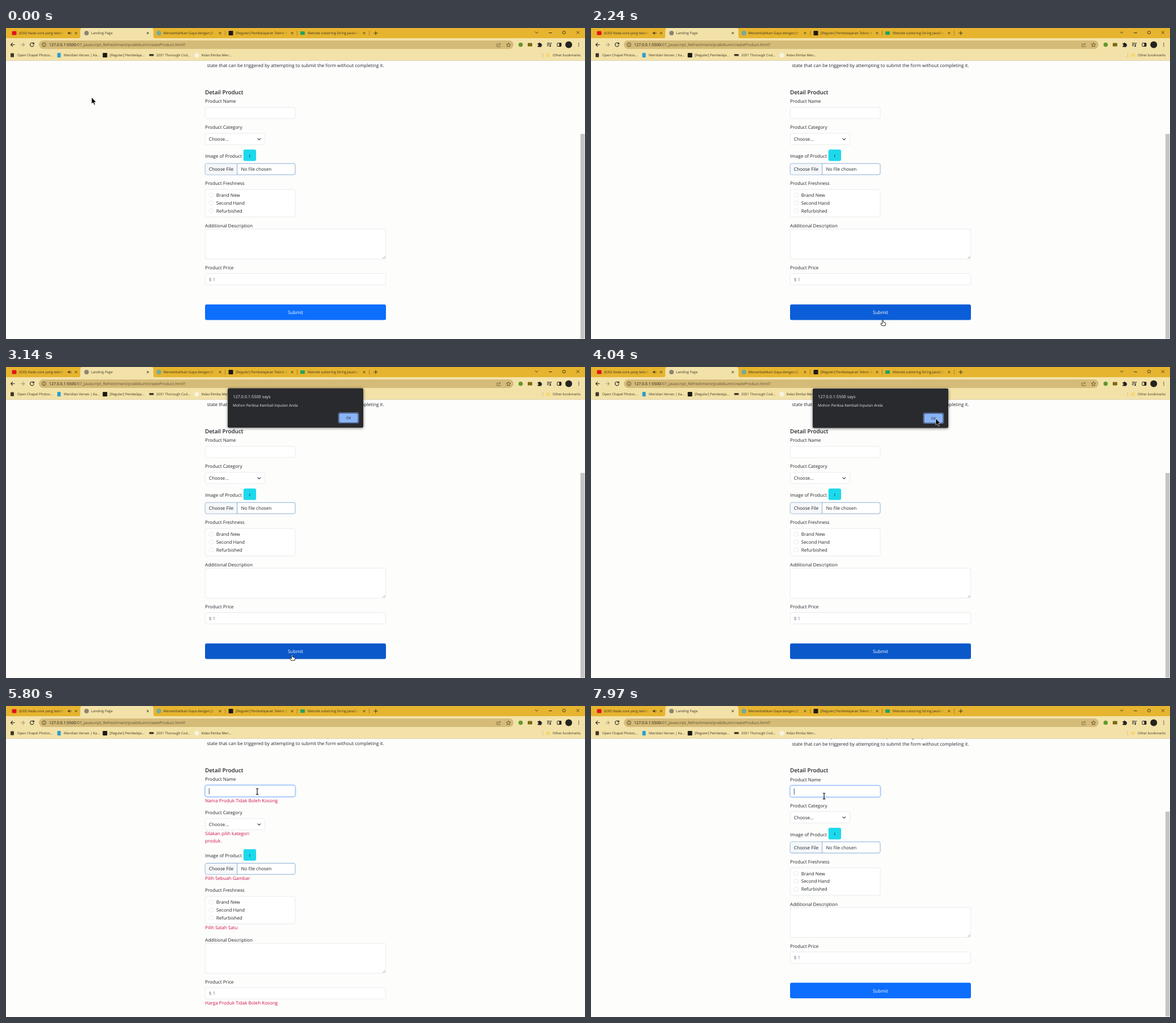
An HTML page that plays this animation: 1021 px wide and 549 px high, repeating every 8 s.

```html
<!DOCTYPE html>
<html lang="id">
<head>
<meta charset="utf-8">
<title>Landing Page</title>
<style>
html, body { margin: 0; width: 100%; height: 100%; overflow: hidden; background: #fdfdfc }
svg { display: block; width: 1021px; height: 549px }
text { font-family: "Open Sans", "Noto Sans", sans-serif; text-rendering: geometricPrecision; white-space: pre }
</style>
</head>
<body>
<svg id="stage" viewBox="0 0 1021 549"></svg>
<script>
const STRIP = '#e6b42f', BAR = '#f3e2a8', INK = '#212529', LINE = '#dee2e6', DARK = '#3b3423';
const LOOP = 8000, STEP = 12.77;

// Text is placed by the vertical centre of its capitals.
const text = (x, y, s, size = 8.12, fill = INK, more = '') =>
  `<text x="${x}" y="${y + size * 0.36}" font-size="${size}" fill="${fill}" ${more}>${s}</text>`;
const rect = (x, y, w, h, fill, r = 0, more = '') =>
  `<rect x="${x}" y="${y}" width="${w}" height="${h}" rx="${r}" fill="${fill}" ${more}/>`;
const circle = (x, y, r, fill, more = '') => `<circle cx="${x}" cy="${y}" r="${r}" fill="${fill}" ${more}/>`;
const line = (d, stroke = DARK, w = 1, more = '') =>
  `<path d="${d}" fill="none" stroke="${stroke}" stroke-width="${w}" ${more}/>`;
const group = (id, body, more = '') => `<g id="${id}" ${more}>${body}</g>`;
const field = (y, w, h, stroke = LINE) => rect(351.2, y, w, h, '#fff', 3, `stroke="${stroke}" stroke-width=".7"`);
const cross = (x, y, r = 2) => line(`M${x - r} ${y - r}l${2 * r} ${2 * r}m0 ${-2 * r}l${-2 * r} ${2 * r}`, DARK, 0.9);

function tab(x, title, icon, end) {
  return icon + `<svg x="${x}" y="0" width="${end - x}" height="18">${text(0, 9, title, 6.1, DARK)}</svg>`
    + rect(end - 12, 2, 12, 14, 'url(#fade)');
}

function toolbar() {
  let s = rect(0, 0, 1021, 19, STRIP) + rect(0, 18, 1021, 39, BAR) + rect(0, 57, 1021, 0.8, '#d9cda9');
  s += `<path d="M127 18.5q4 0 4-4V4q0-4 4-4h121q4 0 4 4v10.500q0 4 4 4z" fill="${BAR}"/>`;
  s += tab(23, '(630) Nada sore yang teduh untuk', rect(10.500, 5.500, 8, 7, '#e3121b', 1.500), 104);
  s += '<path d="M109 8h1.500l2-1.800v5.600l-2-1.800h-1.500z" fill="#3b3423"/>' + line('M114 7.300q1.600 1.700 0 3.400', DARK, 0.8);
  s += circle(142, 9, 4, '#8b8572') + text(150, 9, 'Landing Page', 6.1, DARK);
  s += tab(277.500, 'Menambahkan Gaya dengan JS', circle(269.500, 9, 4.300, '#74aa9c'), 371);
  s += tab(405, '[Reguler] Pembelajaran Teknis Reguler', rect(392.500, 5, 8, 8, '#1d1a14', 1), 498);
  s += tab(532, 'Metode substring String JavaScript', rect(519, 6, 8, 6, '#1fa463', 1), 624);
  for (const x of [123.500, 250, 377.500, 504.500, 631.500]) s += cross(x, 9);
  for (const x of [386, 513, 640]) s += rect(x, 5, 0.7, 8, '#8a6c1d');
  s += line('M648.500 9h7M652 5.500v7M933 6.500l2.700 2.700 2.700-2.700M957 8.500h6', DARK);
  s += rect(981.800, 5.800, 4.500, 4.500, 'none', 0.8, `stroke="${DARK}" stroke-width=".9"`) + cross(1008.500, 8, 2.500);

  s += rect(58, 22, 837, 15, '#d5bb78', 7.500);
  s += line('M15.500 29.500h-7m3.300-3.300l-3.300 3.300 3.300 3.300', '#222', 1.100);
  s += line('M25.500 29.500h7m-3.300-3.300l3.300 3.300-3.300 3.300', '#a99c72', 1.100);
  s += line('M48.500 27.200a3.400 3.400 0 1 0 .7 3M49.300 25.500v2.600h-2.600', '#222', 1.100);
  s += circle(67, 29.500, 3.400, 'none', `stroke="${DARK}" stroke-width=".8"`) + line('M67 29v2.200M67 27.300v.9', DARK, 0.8);
  s += text(76, 29.500, '127.0.0.1:5500<tspan fill="#5d5131">/07_Javascript_Refreshment/praktikum/createProduct.html?</tspan>', 6.960, '#1c1a14');
  s += line('M867.500 28h-1.800v5h6v-1.500M867.800 31q.3-3 4-3m-1.500-1.700l1.800 1.700-1.800 1.700', '#6b5d38', 0.8);
  s += line('M886 26l1.100 2.400 2.600.3-1.900 1.800.5 2.600-2.300-1.300-2.300 1.300.5-2.600-1.900-1.800 2.600-.3z', '#4c4227', 0.8);
  s += circle(907.500, 29.500, 3.800, '#5e9a2b') + rect(920, 26.500, 8, 6, '#7b6a14', 1);
  s += '<path d="M937.500 27h2a1.300 1.300 0 1 1 2.600 0h2v2a1.300 1.300 0 1 1 0 2.600v2h-6.600v-2.200a1.200 1.200 0 1 0 0-2.300z" fill="#222"/>';
  s += line('M954 26.700h5M954 29h5M954 31.300h3M960.300 32v-5.300h2', '#222', 1) + circle(959.600, 32, 1.200, '#222');
  s += rect(972, 26.500, 7, 6, 'none', 0.8, 'stroke="#222"') + rect(975.500, 26.500, 3.500, 6, '#222');
  s += circle(992.300, 29.500, 6, '#25231f');
  for (const y of [26.800, 29.500, 32.200]) s += circle(1010, y, 0.8, '#222');

  const marks = [
    [20, 'Open Chapel Photos...', rect(8, 44.500, 6, 7, '#3d382a', 1)],
    [102, 'Meridian Verses | Ka...', rect(90.500, 44, 6, 8, '#2a9fd0', 1)],
    [183, '[Reguler] Pembelaja...', rect(170.500, 44, 8, 8, '#1d1a14', 1)],
    [265, '2031 Thorough Cod...', rect(252.500, 46, 8, 3.500, '#3d382a', 1)],
    [344.500, 'Kelas Rimba Men...', circle(336.500, 48, 4.200, '#f8f3df')],
    [964, 'Other bookmarks', rect(952, 45, 7, 6, '#f7d774', 1)]
  ];
  for (const [x, label, icon] of marks) s += icon + text(x, 48, label, 6, DARK);
  return s + rect(946, 44, 0.7, 8, '#c7b57a');
}

function page() {
  const rows = [
    [0, text(351, 129.500, 'Product Name') + group('name', field(140, 158.800, 20))
      + group('caret', rect(357.800, 145, 0.8, 11, INK))],
    [1, text(351, 175.500, 'Product Category') + field(186, 105.500, 20) + text(357.800, 196, 'Choose...')
      + line('M443.500 194.800l2.800 2.600 2.800-2.600', '#343a40', 1.100)],
    [3, text(351, 226, 'Image of Product') + rect(418.700, 214.500, 22.300, 20.300, '#1cd9ec', 3)
      + '<text x="428.700" y="227.500" font-size="6.500" font-style="italic" style="font-family:\'Noto Serif\',serif">i</text>'
      + field(239.200, 158.800, 19.800, '#5a8fc0') + rect(351.800, 239.700, 55.500, 18.800, '#f5f7f9', 2)
      + rect(407.200, 239.200, 0.7, 19.800, '#5a8fc0')
      + text(357.800, 249.200, 'Choose File') + text(414.500, 249.200, 'No file chosen')],
    [4, text(351, 274.200, 'Product Freshness') + field(285, 158.800, 48.500)
      + ['Brand New', 'Second Hand', 'Refurbished'].map((s, i) => {
        const y = 295 + i * 13.8;
        return circle(362, y, 4, '#fff', `stroke="${LINE}" stroke-width=".7"`) + text(370.800, y, s);
      }).join('')],
    [5, text(351, 349, 'Additional Description') + field(355, 318.500, 53)
      + line('M664.500 406.800l4-4M667 406.800l1.500-1.500', '#777', 0.7)
      + text(351, 423.200, 'Product Price') + field(433.500, 318.500, 20) + text(357.800, 443.700, '$ 1', 8.12, '#6c757d')],
    [6, group('submit', rect(351, 488, 319, 27.500, 'currentColor', 3))
      + text(510.500, 502, 'Submit', 8.12, '#fff', 'text-anchor="middle"')]
  ];
  const errors = [
    [167, 'Nama Produk Tidak Boleh Kosong'], [225.500, 'Silakan pilih kategori'], [238.200, 'produk.'],
    [304, 'Pilih Sebuah Gambar'], [391.500, 'Pilih Salah Satu'], [524.300, 'Harga Produk Tidak Boleh Kosong']
  ];
  const mid = 'text-anchor="middle"';
  return text(510.500, 53.200, "with Bootstrap's form controls. Each required form group has a validation", 8.12, INK, mid)
    + text(510.500, 66, 'state that can be triggered by attempting to submit the form without completing it.', 8.12, INK, mid)
    + text(351, 113, 'Detail Product', 9.800, INK, 'font-weight="600"')
    + rows.map(([n, body]) => `<g class="row" data-n="${n}">${body}</g>`).join('')
    + group('errors', errors.map(([y, s]) => text(351, y, s, 8.12, '#d01045')).join(''));
}

const dialog = rect(391, 37.500, 239, 69.500, '#292a2d', 2, 'style="filter:drop-shadow(0 1px 2.500px #0008)"')
  + text(400, 52, '127.0.0.1:5500 says', 7.350, '#e8eaed')
  + text(400, 67.500, 'Mohon Periksa Kembali Inputan Anda', 6.530, '#e8eaed')
  + group('ring', rect(586.300, 80.500, 35.400, 18.500, 'none', 2.500, 'stroke="#5f7fb5" stroke-width="1.200"'))
  + rect(587.500, 81.700, 33, 16.200, '#8ab4f8', 2)
  + text(604, 89.800, 'OK', 6.200, '#202124', 'text-anchor="middle"');

const cursors = {
  arrow: '<path d="M0 0V11.500L2.600 9.100 4.500 13.300 6.300 12.500 4.500 8.500H8Z" fill="#000" stroke="#fff" stroke-width=".6"/>',
  hand: '<path d="M-1 1Q0-.5 1 1V4.500L4.300 5.200Q5.300 5.500 5.200 7L4.500 10.500H-1.500L-4 7Q-3.500 5.500-1 7.200Z" fill="#fff" stroke="#111" stroke-width=".9"/>',
  beam: line('M-2.300-5.300Q0-5.300 0-4Q0-5.300 2.300-5.300M0-4.500V4.500M-2.300 5.300Q0 5.300 0 4Q0 5.300 2.300 5.300', '#000', 1.100)
};

const stage = document.getElementById('stage');
stage.innerHTML = `<defs><linearGradient id="fade"><stop stop-color="${STRIP}" stop-opacity="0"/>`
  + `<stop offset="1" stop-color="${STRIP}"/></linearGradient></defs>`
  + rect(0, 0, 1021, 549, '#fdfdfc') + group('page', page())
  + group('thumb', rect(1013, 187, 7.500, 361.500, '#c5c5c6')) + toolbar() + group('dialog', dialog)
  + group('cursor', Object.entries(cursors).map(([id, body]) => group(id, body)).join(''));

const el = id => document.getElementById(id);
const show = (id, on) => el(id).setAttribute('visibility', on ? 'visible' : 'hidden');
const move = (node, x, y) => node.setAttribute('transform', `translate(${x} ${y})`);
const ramp = (t, a, b) => Math.min(1, Math.max(0, (t - a) / (b - a)));
const mix = (a, b, k) => a.map((v, i) => v + (b[i] - v) * k);
const rows = [...document.querySelectorAll('.row')];
const nameBox = el('name').firstChild;

// Pointer moves: begin, end, x, y.
const moves = [
  [40, 300, 480, 240], [1140, 1440, 839, 345], [1840, 2110, 514.500, 512], [2110, 2240, 514.500, 515],
  [2800, 2980, 504.500, 507.500], [3670, 4040, 608, 91], [5640, 5740, 443, 151],
  [6140, 6270, 436, 153], [7340, 7670, 411, 159]
];

function draw(t) {
  let spot = [151, 122.500];
  for (const [a, b, x, y] of moves) {
    const k = ramp(t, a, b);
    spot = mix(spot, [x, y], k * k * (3 - 2 * k));
  }
  move(el('cursor'), ...spot);
  const shape = t >= 5710 ? 'beam' : t >= 2080 && t < 3700 ? 'hand' : 'arrow';
  for (const id in cursors) show(id, id === shape);

  const invalid = t >= 4780 && t < 6560, scrolled = t >= 6560;
  move(el('page'), 0, scrolled ? 0.6 : 0);
  move(el('thumb'), 0, scrolled ? -0.6 : 0);
  for (const row of rows) move(row, 0, invalid ? row.dataset.n * STEP : 0);
  show('errors', invalid);
  show('thumb', !invalid);

  let blue = [13, 110, 253];
  if (t < 4780) {
    blue = mix(blue, [11, 94, 215], ramp(t, 2080, 2230));
    blue = mix(blue, [10, 88, 202], ramp(t, 2950, 3100));
  }
  el('submit').setAttribute('color', `rgb(${blue.map(Math.round)})`);

  const focus = ramp(t, 5690, 5790);
  nameBox.setAttribute('stroke', `rgb(${mix([222, 226, 230], [134, 183, 254], focus).map(Math.round)})`);
  nameBox.style.filter = focus ? `drop-shadow(0 0 1.200px rgba(13,110,253,${0.7 * focus}))` : 'none';
  show('caret', t >= 5720 && !(t >= 6470 && t < 7000) && !(t >= 7500 && t < 7970));

  show('dialog', t >= 3030 && t < 4900);
  el('dialog').setAttribute('opacity', ramp(t, 3000, 3110));
  move(el('dialog'), 0, t < 3370 ? 0 : 0.5);
  el('ring').setAttribute('opacity', t < 4670 ? 1 : 0);
}

function tick() {
  draw(performance.now() % LOOP);
  requestAnimationFrame(tick);
}
tick();
</script>
</body>
</html>
```
